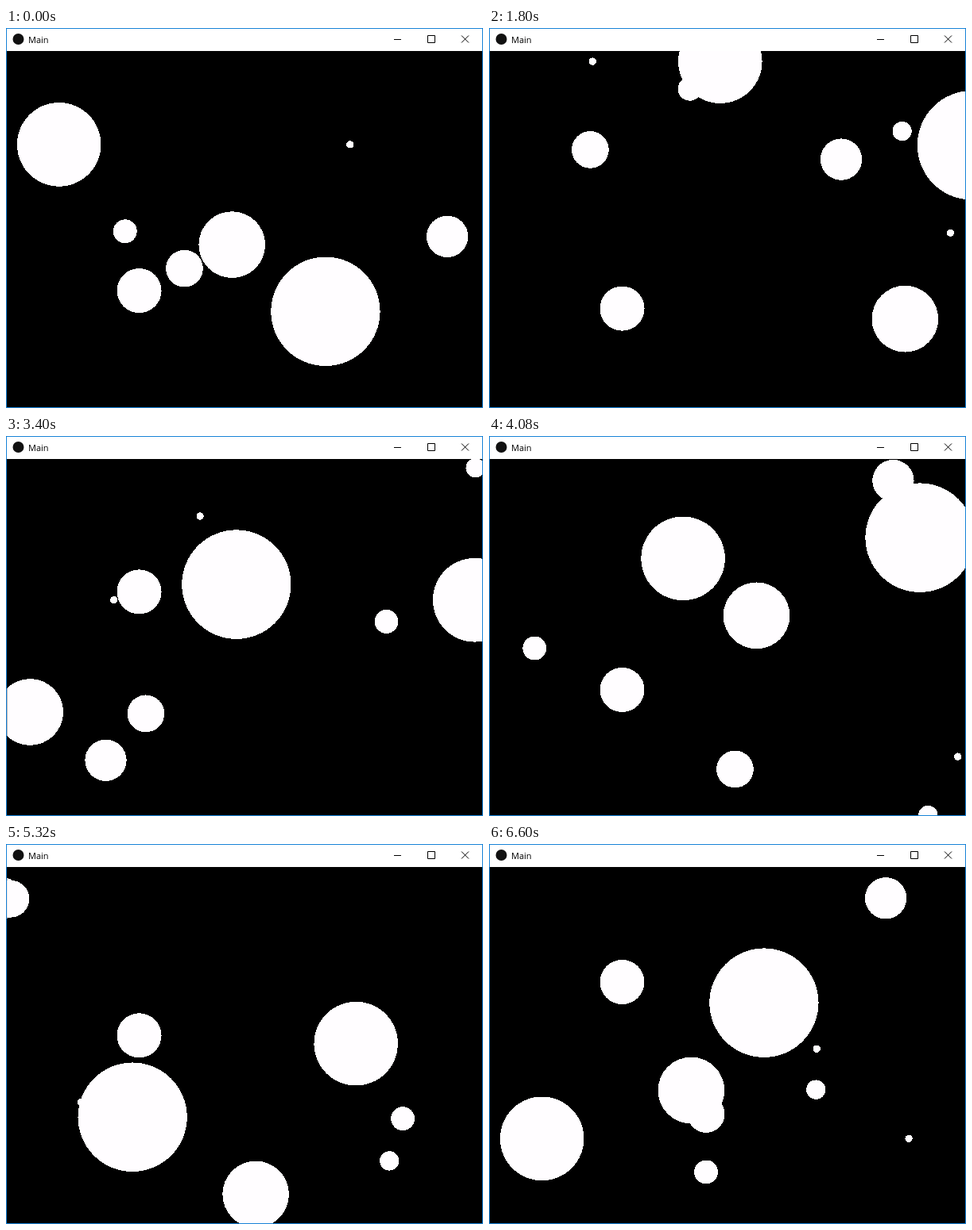
These frames come from a looping animation (600 by 479 pixels, 6.64 s). An HTML page:

```html
<!DOCTYPE html>
<html lang="en">
<head>
<meta charset="utf-8">
<title>Main</title>
<style>
  html, body { margin: 0; width: 100%; height: 100%; overflow: hidden; background: #000; }
  svg { display: block; width: 600px; height: 479px; }
  text { font: 11px "Open Sans", "Noto Sans", sans-serif; }
</style>
</head>
<body>
<svg viewBox="0 0 600 479">
  <rect width="600" height="479" fill="#1883d7"/>
  <rect x="1" y="1" width="598" height="28" fill="#fff"/>
  <circle cx="15.5" cy="14" r="7" fill="#111"/>
  <text x="28" y="19">Main</text>
  <g fill="none" stroke="#000">
    <path d="M488 14.5h9M530.5 9.5h9v9h-9z"/>
    <path d="M573 9.5l9 9M582 9.5l-9 9"/>
  </g>
  <rect x="1" y="29" width="598" height="449"/>
  <!-- The scene at rest; data-v is the velocity per tick. -->
  <svg x="1.3" y="29" width="597.7" height="449" viewBox="0 0 640 480" preserveAspectRatio="none"
       fill="#fffdff" shape-rendering="crispEdges">
    <circle cx="70" cy="126" r="56.5" data-v="-10 8"/>
    <circle cx="462" cy="126" r="5" data-v="-3 8"/>
    <circle cx="440" cy="413" r="5" data-v="-10 12"/>
    <circle cx="159" cy="243" r="16" data-v="-11 -12"/>
    <circle cx="178" cy="323" r="30" data-v="0 12"/>
    <circle cx="239" cy="293" r="25" data-v="-13 5"/>
    <circle cx="303" cy="261" r="44.8" data-v="-8 10"/>
    <circle cx="429" cy="351" r="73.5" data-v="-10 7"/>
    <circle cx="593" cy="250" r="28" data-v="-10 -13"/>
    <circle cx="447" cy="396" r="13" data-v="1 -12"/>
  </svg>
</svg>
<script>
const WIDTH = 640, HEIGHT = 480;
const LOOP_MS = 6640, STEP_MS = 40, TICKS_PER_MS = 0.06;

const balls = [...document.querySelectorAll("[data-v]")].map(node => {
  const [vx, vy] = node.dataset.v.split(" ").map(Number);
  return { node, vx, vy, x: +node.getAttribute("cx"), y: +node.getAttribute("cy") };
});

const mod = (a, n) => ((a % n) + n) % n;

// Triangle wave: a centre turns at its first tick beyond either wall.
function bounce(pos, speed, limit, ticks) {
  if (!speed) return pos;
  const stride = Math.abs(speed);
  const low = pos % stride - stride;
  const high = limit + stride - (limit - pos) % stride;
  const span = high - low;
  return high - Math.abs(span - mod(pos - low + speed * ticks, 2 * span));
}

function render(ms) {
  const shown = Math.floor(ms % LOOP_MS / STEP_MS) * STEP_MS;
  const ticks = Math.floor(shown * TICKS_PER_MS + 0.8);
  for (const { node, x, y, vx, vy } of balls) {
    node.setAttribute("cx", bounce(x, vx, WIDTH, ticks));
    node.setAttribute("cy", bounce(y, vy, HEIGHT, ticks));
  }
}

const start = performance.now();
function loop() {
  render(performance.now() - start);
  requestAnimationFrame(loop);
}
loop();
</script>
</body>
</html>
```
